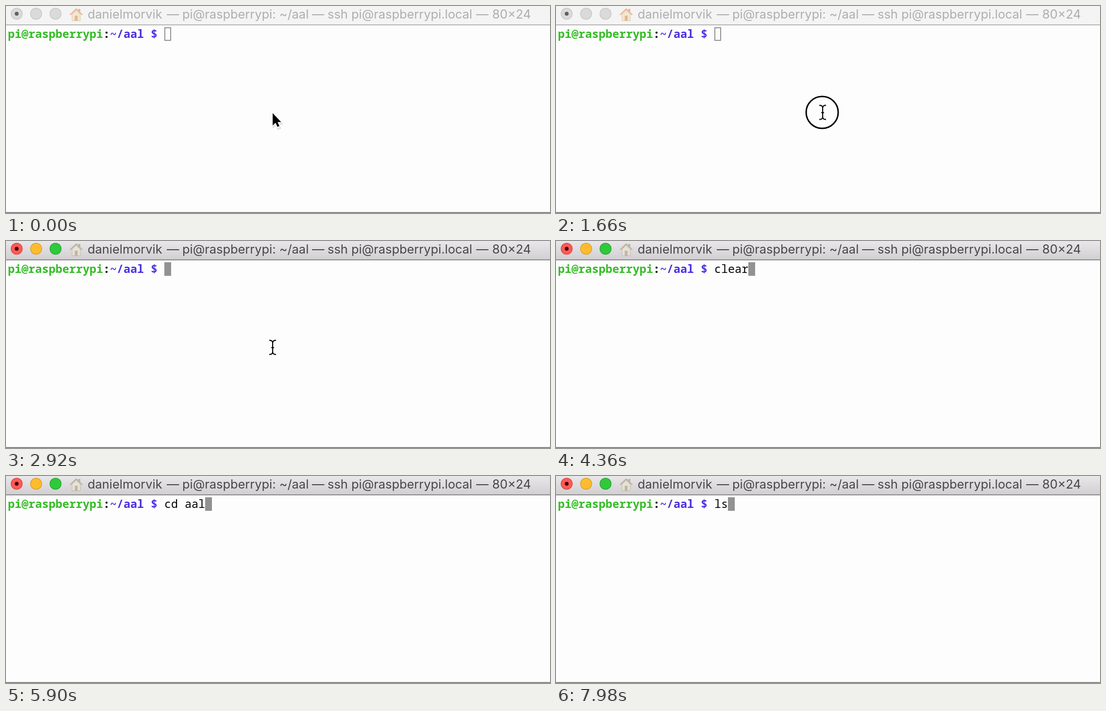
An HTML page that plays this animation: 1120 by 428 pixels, repeating every 8 s.

```html
<!DOCTYPE html>
<html lang="en">
<head>
<meta charset="utf-8">
<title>Terminal</title>
<style>
  html, body { margin: 0; width: 100%; height: 100%; overflow: hidden; background: #fdfdfd; }
  svg { display: block; width: 1120px; height: 428px; }
  text { white-space: pre; }
  .title { font: 25.4px Inter, sans-serif; fill: #aeaeae; }
  .term { font: 23.33px "Noto Sans Mono", monospace; }
  .bold { font-weight: 700; }
  #bar { fill: #f4f4f4; }
  #edge { fill: #b6b6b6; }
  .light { fill: #dadada; stroke: #c8c8c8; stroke-width: 1.5; }
  #dot { fill: #606060; }
  #roof { fill: #e8b896; }
  #walls { fill: #f3e6d3; stroke: #dcc8a8; }
  #door { fill: #e2b88e; }
  #caret { fill: none; stroke: #929292; stroke-width: 2; }
  .active #bar { fill: url(#shade); }
  .active #edge { fill: #8b8b8b; }
  .active .title { fill: #484648; }
  .active .red { fill: #fc5b57; stroke: #df4744; }
  .active .yellow { fill: #fdbc2e; stroke: #de9f30; }
  .active .green { fill: #30c93c; stroke: #27aa35; }
  .active #dot { fill: #4d0000; }
  .active #roof { fill: #bdb5a4; }
  .active #walls { fill: #e6e2d8; stroke: #bbb4a6; }
  .active #door { fill: #c2b6a2; }
  .active #caret { fill: #929292; }
</style>
</head>
<body>
<svg id="stage" viewBox="0 0 1120 428">
  <defs>
    <linearGradient id="shade" x2="0" y2="1">
      <stop stop-color="#e9e7e9"/>
      <stop offset="1" stop-color="#d1cfd1"/>
    </linearGradient>
  </defs>

  <rect id="bar" width="1120" height="38"/>
  <rect id="edge" y="38" width="1120" height="2"/>
  <rect y="426" width="1120" height="2" fill="#878787"/>

  <circle class="light red" cx="22" cy="16" r="11.5"/>
  <circle class="light yellow" cx="62" cy="16" r="11.5"/>
  <circle class="light green" cx="102" cy="16" r="11.5"/>
  <circle id="dot" cx="22" cy="16" r="4"/>

  <path id="walls" d="M136 17L144 9L153 17V30.5H136Z"/>
  <path id="door" d="M141.500 20h6v10.500h-6z"/>
  <path id="roof" d="M131 17.500L144.500 4.500L149 8.500V6h4v6.500L158 17.500L156 19L144.500 8L133 19Z"/>

  <g class="title">
    <text x="168" y="26">danielmorvik</text>
    <text x="331" y="26">—</text>
    <text x="363" y="26">pi@raspberrypi: ~/aal</text>
    <text x="630" y="26">—</text>
    <text x="662" y="26">ssh pi@raspberrypi.local</text>
    <text x="968" y="26">—</text>
    <text x="1001" y="26">80×24</text>
  </g>

  <g class="term">
    <text class="bold" x="4" y="66"><tspan fill="#34bc26">pi@raspberrypi</tspan>:<tspan fill="#492ee1">~/aal $</tspan></text>
    <text id="command" x="326" y="66"></text>
  </g>
  <rect id="caret" x="327" y="45" width="12" height="26"/>

  <g id="arrow" stroke-linejoin="round">
    <path d="M550 225V251L556 246L560 255L565 253L561 244H569Z" opacity=".1" stroke="#000" stroke-width="3"/>
    <path d="M549 221.500V247L555 241.500L559 250L563 248L559 240H566.500Z" stroke="#fff" stroke-width="3" paint-order="stroke"/>
  </g>
  <path id="beam" d="M542 205.500Q549 205 549 211V229Q549 235 542 234.500M556 205.500Q549 205 549 211M549 229Q549 235 556 234.500M546 220.500H552" fill="none" stroke="#000" stroke-width="2.200"/>
  <circle id="ring" cx="548" cy="220" fill="none" stroke="#000" stroke-width="3"/>
</svg>
<script>
  const LOOP = 8000, CELL = 14;
  const ACTIVATE = 1690, BEAM_ON = 1380, BEAM_OFF = 3860;
  const commands = [[0, ""], [3860, "clear"], [5450, "cd aal"], [7280, "ls"]];
  const el = id => document.getElementById(id);
  const ramp = (t, from, to) => Math.min(1, Math.max(0, (t - from) / (to - from)));
  const show = (id, on) => el(id).setAttribute("visibility", on ? "visible" : "hidden");

  function draw(t) {
    el("stage").classList.toggle("active", t >= ACTIVATE);

    const text = commands.filter(c => c[0] <= t).pop()[1];
    if (el("command").textContent !== text) el("command").textContent = text;
    el("caret").setAttribute("x", 327 + CELL * text.length);

    show("arrow", t < BEAM_ON);
    show("beam", t >= BEAM_ON && t < BEAM_OFF);

    // Click ring closes in on press and spreads out on release.
    const press = ramp(t, 1400, 1560), release = ramp(t, 1700, 1950);
    const wide = 1 - press + release;
    el("ring").setAttribute("r", 33 + 14 * wide);
    el("ring").setAttribute("opacity", 1 - wide);
  }

  function tick() {
    draw(performance.now() % LOOP);
    requestAnimationFrame(tick);
  }
  tick();
</script>
</body>
</html>
```
